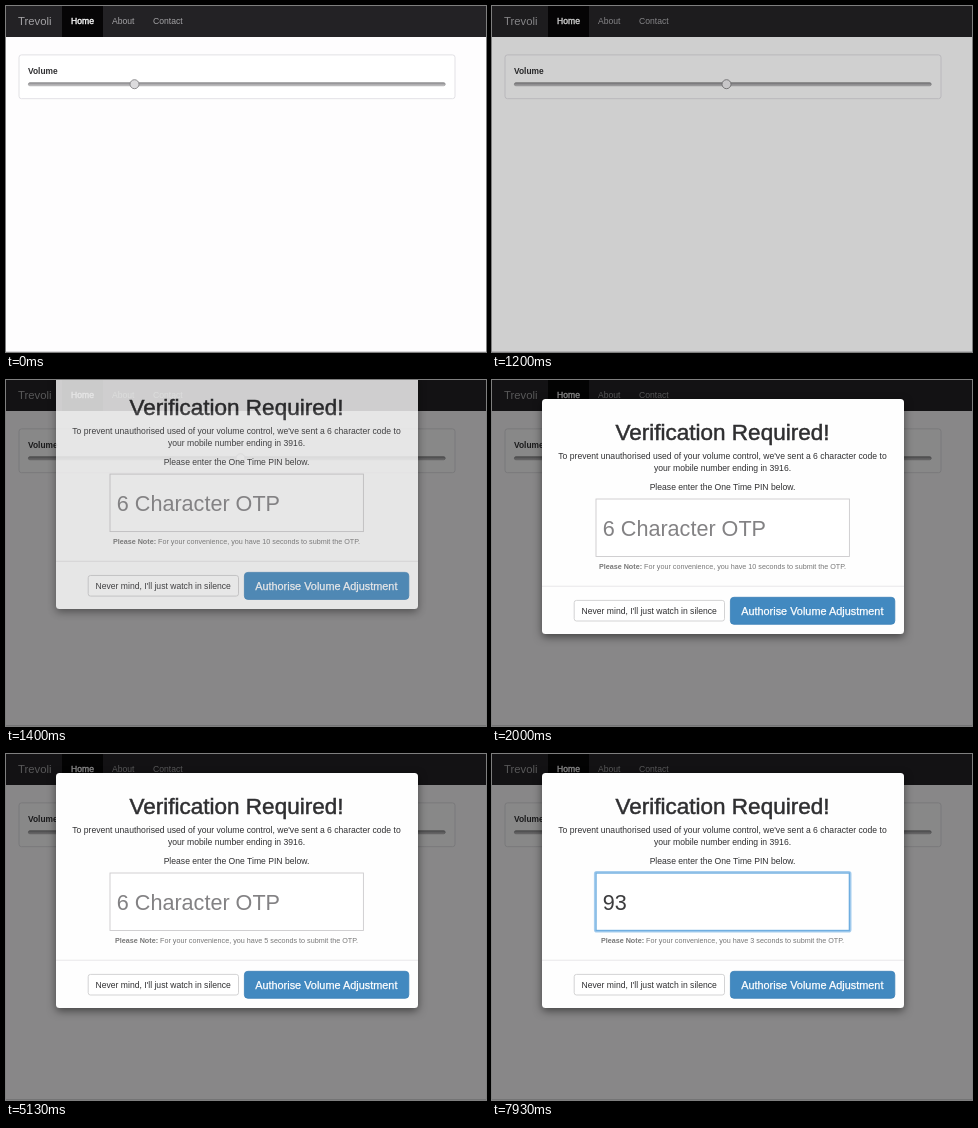
These frames come from a looping animation (480x346 px, 8 s). An HTML page:

```html
<!DOCTYPE html>
<html lang="en">
<head>
<meta charset="utf-8">
<title>Volume verification</title>
<style>
  html, body { margin: 0; width: 100%; height: 100%; overflow: hidden; background: #fff; }
  svg { display: block; width: 480px; height: 346px; }
  text { font: 8.6px "Liberation Sans", Arial, sans-serif; fill: #2f2f31; }
  .mid { text-anchor: middle; }
  .nav { fill: #a3a2a5; }
  .home { fill: #fff; stroke: #fff; stroke-width: .35px; }
  .brand { font-size: 11.3px; }
  .label { font-size: 8.4px; font-weight: bold; }
  .title { font-size: 22.5px; stroke: #2f2f31; stroke-width: .5px; }
  .note { font-size: 7.2px; fill: #777; }
  .note .strong { font-weight: bold; }
  .entry { font-size: 21.6px; }
  .action { font-size: 10.9px; fill: #fff; stroke: #fff; stroke-width: .25px; }
  .sheet { filter: drop-shadow(0 3px 4px rgba(0, 0, 0, .5)); }
</style>
</head>
<body>
<svg viewBox="0 0 480 346" xmlns="http://www.w3.org/2000/svg">
  <defs>
    <linearGradient id="groove" x2="0" y2="1">
      <stop offset="0" stop-color="#868587"/>
      <stop offset="1" stop-color="#c9c8ca"/>
    </linearGradient>
  </defs>

  <rect width="480" height="346" fill="#fefdfe"/>
  <rect y="345" width="480" height="1" fill="#d9d8da"/>
  <rect width="480" height="31" fill="#232225"/>
  <rect x="56" width="41" height="31" fill="#060506"/>
  <text class="nav brand" x="12" y="19">Trevoli</text>
  <text class="nav home" x="65" y="18.3">Home</text>
  <text class="nav" x="106" y="18.3">About</text>
  <text class="nav" x="147" y="18.3">Contact</text>

  <rect x="13" y="48.9" width="436" height="43.8" rx="2.5" fill="#fff" stroke="#e2e1e5"/>
  <text class="label" x="22" y="67.6">Volume</text>
  <rect x="22.3" y="76.6" width="417" height="3.2" rx="1.6" fill="url(#groove)" stroke="#8f8e90" stroke-width=".5"/>
  <circle id="thumb" cy="78.2" r="4.5" stroke="#858486" stroke-width=".9"/>

  <rect id="dim" width="480" height="346"/>

  <g id="modal">
    <rect class="sheet" x="50" y="19" width="362" height="235" rx="3.5" fill="#fefefe"/>
    <text class="title mid" x="230.5" y="60.2">Verification Required!</text>
    <text class="mid" x="230.5" y="79.2">To prevent unauthorised used of your volume control, we've sent a 6 character code to</text>
    <text class="mid" x="230.5" y="91.3">your mobile number ending in 3916.</text>
    <text class="mid" x="230.5" y="109.6">Please enter the One Time PIN below.</text>
    <rect id="glow" x="102.7" y="117.7" width="256" height="60" rx="2" fill="none" stroke="#a5cdee" stroke-width="1.6"/>
    <rect id="field" x="104" y="119" width="253.4" height="57.5" fill="#fff"/>
    <text class="entry" id="entry" x="110.8" y="155.6"></text>
    <rect id="caret" y="134.5" width="1" height="26.5" fill="#333"/>
    <text class="note mid" x="230.5" y="188.7"><tspan class="strong">Please Note:</tspan> For your convenience, you have <tspan id="left"></tspan> seconds to submit the OTP.</text>
    <path d="M50 206.2H412" stroke="#e6e5e7" stroke-width=".9"/>
    <rect x="82.2" y="220.4" width="150.3" height="20.6" rx="2.3" fill="#fff" stroke="#cfced0" stroke-width=".9"/>
    <text class="mid" x="157.2" y="233.9">Never mind, I'll just watch in silence</text>
    <rect x="238.4" y="217.3" width="164.4" height="27" rx="3.5" fill="#4289c0" stroke="#397fb6" stroke-width=".8"/>
    <text class="action mid" x="320.3" y="234.6">Authorise Volume Adjustment</text>
  </g>
</svg>

<script>
const LOOP = 8000, TICK = 1000 / 15;
const byId = id => document.getElementById(id);
const [thumb, dim, modal, glow, field, entry, caret, left] =
  ["thumb", "dim", "modal", "glow", "field", "entry", "caret", "left"].map(byId);

const ramp = (t, from, to) => Math.min(1, Math.max(0, (t - from) / (to - from)));
const smooth = p => p * p * (3 - 2 * p);
const easeOut = p => 1 - (1 - p) ** 1.72;
const mix = (a, b, p) => a.map((v, i) => Math.round(v + (b[i] - v) * p));
const set = (el, attrs) => {
  for (const name in attrs) el.setAttribute(name, attrs[name]);
};

// Latest value whose start time has passed
const at = (t, steps) => steps.filter(s => t >= s[0]).pop()[1];

const COUNT = [[0, 10], [2120, 8], [3120, 7], [5120, 5], [6120, 4], [7120, 3]];
const TYPED = [[0, ""], [6660, "9"], [7390, "93"]];
const CARET = [[0, 0], [5530, 1], [6060, 0], [6530, 1], [7190, 0], [7390, 1], [7930, 0]];

function draw(ms) {
  // The picture advances fifteen times a second
  const t = Math.floor((ms + 3.4) / TICK) * TICK;

  set(thumb, {
    cx: 128.5 + 106 * smooth(ramp(t, 200, 980)),
    fill: t < 990 ? "#dcdbdd" : "#f4f3f5"
  });
  set(dim, { opacity: 0.465 * ramp(t, 1140, 1290) });

  set(modal, {
    opacity: ramp(t, 1280, 1430),
    transform: `translate(0 ${-60 * (1 - easeOut(ramp(t, 1280, 1580)))})`
  });

  const focus = ramp(t, 5480, 5660);
  set(glow, { opacity: focus });
  set(field, {
    stroke: `rgb(${mix([204, 203, 205], [112, 174, 224], focus)})`,
    "stroke-width": 0.9 + 0.5 * focus
  });

  const typed = at(t, TYPED);
  entry.textContent = typed || "6 Character OTP";
  entry.style.fill = typed ? "#3c3c3e" : "#838284";
  set(caret, { x: 110.8 + 12 * typed.length, opacity: at(t, CARET) });
  left.textContent = at(t, COUNT);
}

const start = performance.now();
function frame() {
  draw((performance.now() - start) % LOOP);
  requestAnimationFrame(frame);
}
frame();
</script>
</body>
</html>
```
